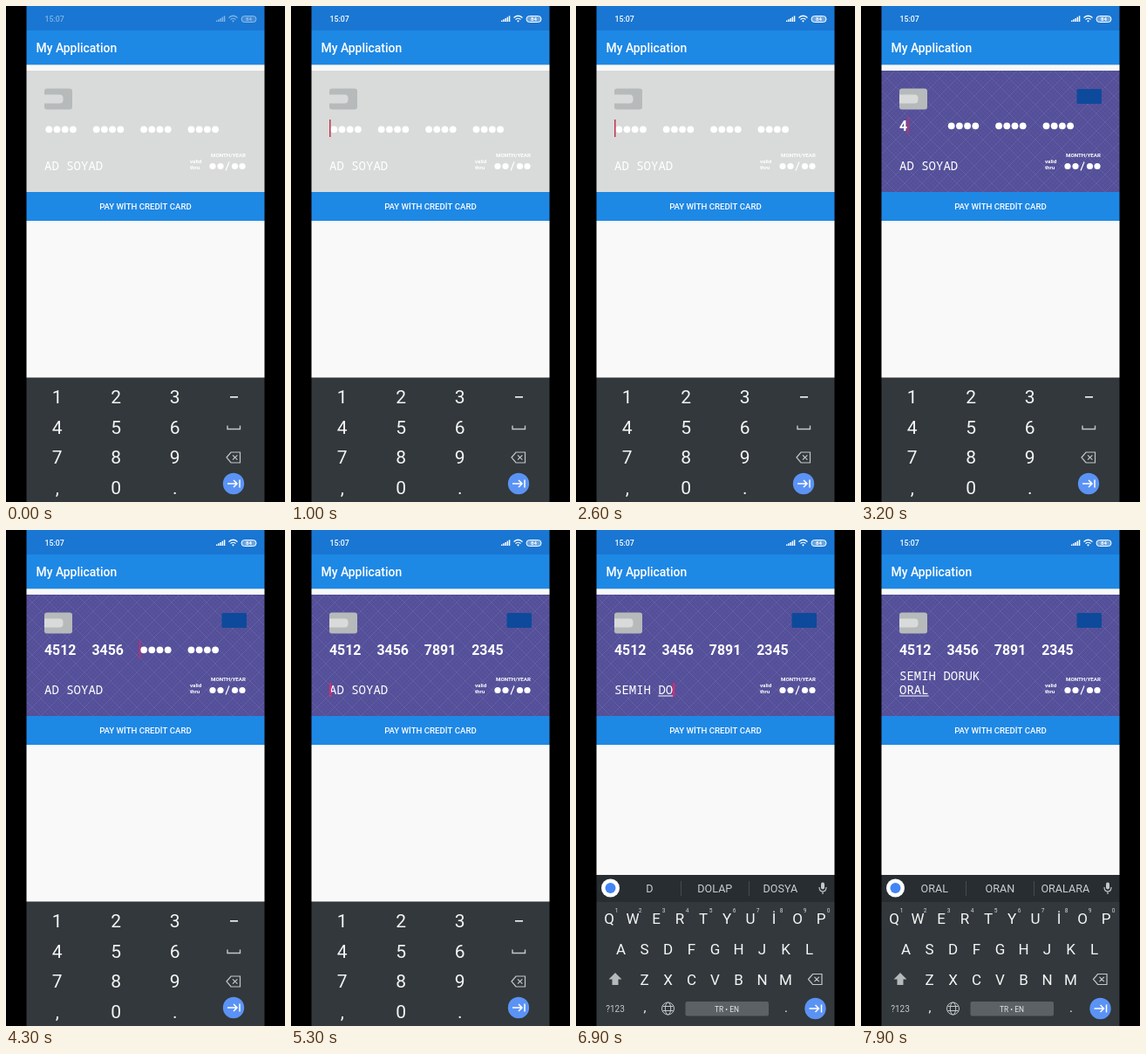
An HTML page with a canvas for the animation above (8 s loop, 320 px wide and 568 px high).

```html
<!DOCTYPE html>
<html lang="en">
<head>
<meta charset="utf-8">
<title>Card entry</title>
<style>
html, body { margin: 0; width: 100%; height: 100%; overflow: hidden; background: #000; }
canvas { display: block; }
</style>
</head>
<body>
<canvas width="320" height="568"></canvas>
<script>
const c = document.querySelector('canvas').getContext('2d');
const LOOP = 8000, CARD = '4512345678912345', NAME = 'SEMIH DORUK ORAL';
const CARD_AT = 2800, QWERTY_AT = 5600, BLUE = '#1e88e5', PANEL = '#32383b';

const digitTime = k => k ? 3460 + (k - 1) * 125 : CARD_AT;
const letterTime = k => k < 8 ? 5800 + k * 150 : 6850 + (k - 7) * 65;
const typed = (t, at) => { let n = 0; while (n < 16 && t >= at(n)) n++; return n; };
const clamp = v => Math.max(0, Math.min(1, v));

function box(x, y, w, h, color, r = 0) {
  c.fillStyle = color;
  c.beginPath();
  c.roundRect(x, y, w, h, r);
  c.fill();
}
function dot(x, y, r, color = '#fff') {
  c.fillStyle = color;
  c.beginPath();
  c.arc(x, y, r, 0, 7);
  c.fill();
}
function stroke(path, color = '#c4c8ca', width = 1.2) {
  c.strokeStyle = color;
  c.lineWidth = width;
  c.stroke(new Path2D(path));
}
function text(s, x, y, size, { weight = 400, color = '#fff', align = 'left', font = 'Roboto, sans-serif' } = {}) {
  c.font = `${weight} ${size}px ${font}`;
  c.fillStyle = color;
  c.textAlign = align;
  c.fillText(s, x, y);
}
const center = (s, x, y, size, color = '#f4f5f5', weight = 400) =>
  text(s, x, y, size, { color, weight, align: 'center' });

function header(t) {
  box(23, 0, 274, 28, '#1976d2');
  box(23, 28, 274, 39, BLUE);
  box(23, 67, 274, 1, '#b9d2e6');
  text('My Application', 34.5, 52.5, 13.9, { weight: 500 });

  c.globalAlpha = .45 + .55 * clamp(t / 500);
  text('15:07', 44.5, 18, 8.8, { weight: 500 });
  for (let i = 0; i < 5; i++) box(241 + i * 2.2, 16.5 - i * 1.3, 1.5, 1.5 + i * 1.3, '#fff');
  stroke('M255.5 13.5q5-4.5 10 0M257.5 15.5q3-2.5 6 0', '#fff', 1.2);
  dot(260.5, 17.3, 1.1);
  box(270, 11.5, 17, 7, 'rgba(255,255,255,.35)', 3.5);
  stroke('M273.5 11.5h10a3.5 3.5 0 0 1 0 7h-10a3.5 3.5 0 0 1 0-7z', '#fff', 1);
  center('84', 278.5, 17.3, 6, '#fff', 700);
  c.globalAlpha = 1;
}

function weave() {
  c.save();
  c.beginPath();
  c.rect(23, 74, 274, 139);
  c.clip();
  for (let i = 0; i < 84; i++) {
    const x = i * 5 - 120;
    stroke(`M${x} 73l140 140M${x + 140} 73l-140 140`,
      i % 4 ? 'rgba(150,135,200,.10)' : 'rgba(165,150,210,.26)', .8);
  }
  c.restore();
}

function card(t, digits, letters) {
  const tint = clamp((t - CARD_AT + 50) / 200);
  box(23, 74, 274, 139, '#d9dbda');
  c.globalAlpha = tint;
  box(23, 74, 274, 139, '#534f98');
  weave();
  box(247.5, 95, 28.5, 17, '#0d4a9c', 1.5);
  c.globalAlpha = 1;

  box(44, 94.5, 32, 24, '#b7babb', 3);
  box(44, 101.5, 21.5, 10, '#d9dbda', [0, 4, 4, 0]);

  for (let g = 0; g < 4; g++) {
    const x = 44 + g * 54.4, part = CARD.slice(g * 4, Math.min(digits, g * 4 + 4));
    if (part) text(part, x, 143, 15.9, { weight: 700 });
    else for (let i = 0; i < 4; i++) dot(x + 5.3 + i * 9.2, digits ? 137.3 : 141.3, 3.9);
  }

  text('MONTH/YEAR', 235, 173, 6.2, { weight: 700 });
  text('valid', 211, 180, 6.2, { weight: 700 });
  text('thru', 211, 187, 6.2, { weight: 700 });
  for (const x of [237, 246, 262.5, 271]) dot(x, 183.5, 3.6);
  stroke('M252 188.5l4-10', '#fff', 1.2);

  const mono = { weight: 500, font: '"Noto Sans Mono", monospace' };
  const entry = NAME.slice(0, letters), wrap = letters > 12;
  const line = wrap ? entry.slice(12) : entry;
  if (wrap) text(NAME.slice(0, 11), 44, 172, 14, mono);
  text(line || 'AD SOYAD', 44, 188, 14, mono);
  const word = line.lastIndexOf(' ') + 1;
  if (line.length > word) box(44 + word * 8.4, 189.5, (line.length - word) * 8.4, 1, '#fff');

  const lastKey = letters ? letterTime(letters - 1) : digits ? digitTime(digits - 1) : 600;
  if (t < 600 || (t - lastKey) % 1000 >= 500) return;
  if (digits === 16) box(44 + line.length * 8.4, 175, 2, 16, '#e0286e');
  else box(44 + (digits >> 2) * 54.4 + digits % 4 * 9.1, digits ? 127 : 130, 1.5, 20, digits ? '#d02a70' : '#c2354f');
}

function backspace(x, y) {
  stroke(`M${x - 8} ${y}l5-6h10.5v12h-10.5zM${x - 1} ${y - 2.7}l5.4 5.4m0-5.4l-5.4 5.4`);
}
function enterKey(x, y) {
  dot(x, y, 12.2, '#5b93f5');
  stroke(`M${x - 7} ${y}h11m-4-4l4 4l-4 4M${x + 7} ${y - 4.5}v9`, '#fff', 1.5);
}

function numberPad() {
  box(23, 425.5, 274, 142.5, PANEL);
  ['123', '456', '789', ',0.'].forEach((row, r) =>
    [...row].forEach((key, i) => center(key, 58.7 + i * 67.5, 455.2 + r * 34.6, 21)));
  box(257, 447, 9, 1.6, '#f4f5f5');
  stroke('M254 480.5v4h14.5v-4', '#c4c8ca', 1.4);
  backspace(261, 517);
  enterKey(261, 547);
}

function qwerty(letters) {
  box(23, 395, 274, 173, PANEL);
  box(23, 395, 274, 31, '#272d30');
  dot(39.5, 410, 10.5);
  dot(39.5, 410, 6, '#4285f4');
  const words = !letters ? ['BEN', 'BU', 'VE']
    : letters < 7 ? ['S', 'SEN', 'SON']
    : letters < 13 ? ['D', 'DOLAP', 'DOSYA']
    : ['ORAL', 'ORAN', 'ORALARA'];
  words.forEach((w, i) => center(w, 84.3 + i * 75, 415, 12.6, '#c9cdd0'));
  stroke('M120.5 402v17M198.5 402v17', '#454c50', 1);
  box(281, 403.5, 4, 8, '#c4c8ca', 2);
  stroke('M279 409q0 5 4 5t4-5M283 414v3');

  [['QWERTYUİOP', 38, 451], ['ASDFGHJKL', 51.5, 486], ['ZXCVBNM', 78.5, 520.5]].forEach(([row, x, y]) =>
    [...row].forEach((key, i) => center(key, x + i * 27, y, 17)));
  for (let i = 0; i < 10; i++) center((i + 1) % 10, 46.5 + i * 27, 437.5, 6.6, '#d5d9db');

  c.fillStyle = '#b4b9bc';
  c.fill(new Path2D('M45 507l7.5 7.5h-4v6.5h-7v-6.5h-4z'));
  backspace(274.5, 514.5);
  center('?123', 45, 552, 10, '#c4c8ca');
  center(',', 79, 552, 15);
  stroke('M98.5 548a7 7 0 1 0 14 0a7 7 0 1 0-14 0zM102.3 548a3.2 7 0 1 0 6.4 0a3.2 7 0 1 0-6.4 0zM99.5 545.5h12M99.5 550.5h12', '#c4c8ca', 1);
  box(125.5, 540, 95.5, 16.5, '#5b6165', 2);
  center('TR • EN', 173, 551.5, 8.4, '#e4e6e7');
  center('.', 241, 552, 15);
  enterKey(274.5, 548);
}

function draw(t) {
  const digits = typed(t, digitTime), letters = typed(t, letterTime);
  box(23, 0, 274, 568, '#f8f9f8');
  header(t);
  card(t, digits, letters);
  box(23, 213, 274, 33, BLUE);
  center('PAY WİTH CREDİT CARD', 160, 233, 9.66, '#fff', 500);
  if (t < QWERTY_AT) numberPad(); else qwerty(letters);
  box(0, 0, 23.5, 568, '#000');
  box(296.5, 0, 23.5, 568, '#000');
}

function tick() {
  draw(performance.now() % LOOP);
  requestAnimationFrame(tick);
}
tick();
</script>
</body>
</html>
```
